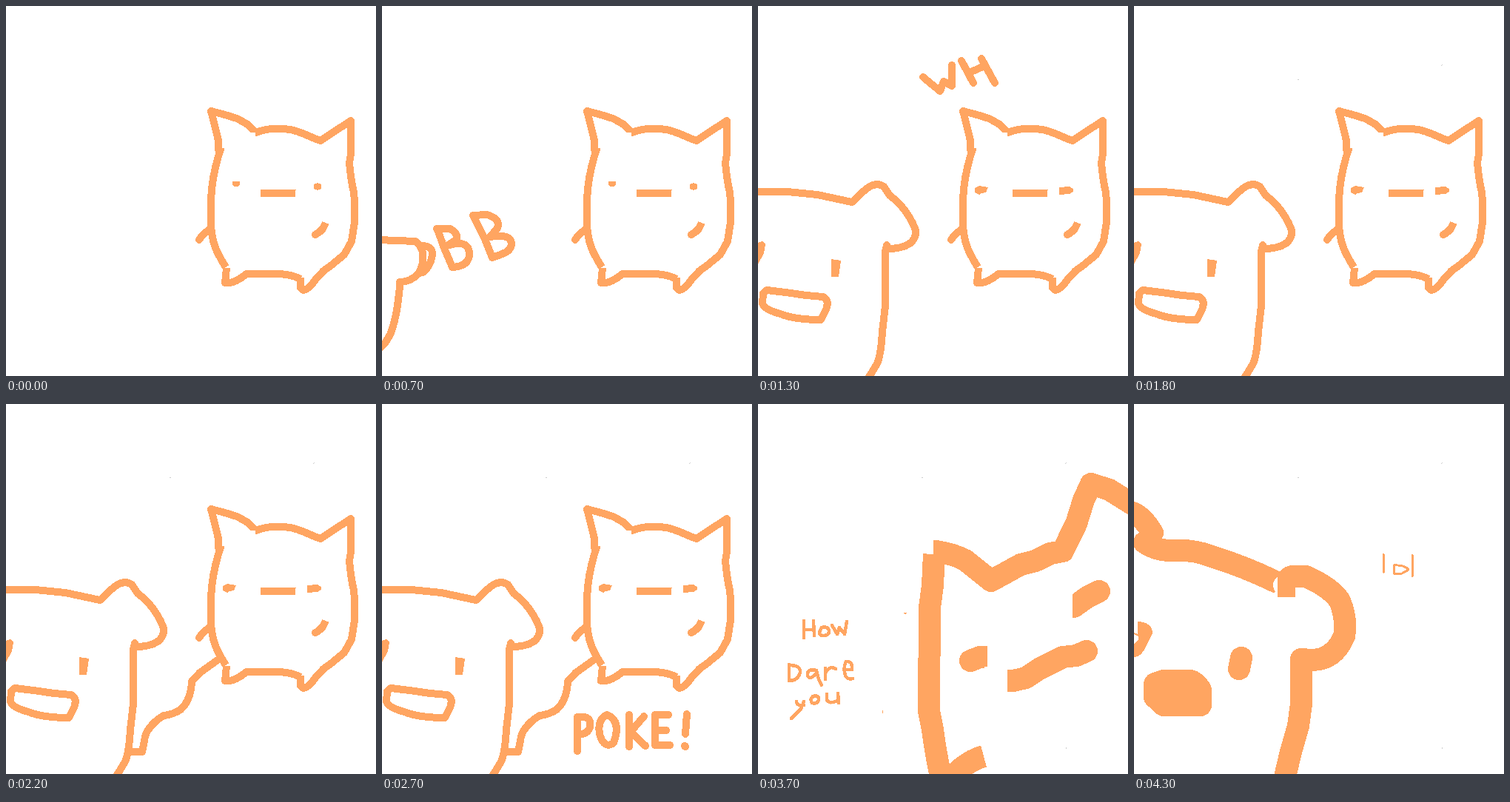
An HTML page that plays this animation: 500 by 500 pixels, repeating every 4500 ms.

```html
<!DOCTYPE html>
<html lang="en">
<head>
<meta charset="utf-8">
<title>Poke</title>
<style>
html, body { margin: 0; width: 100%; height: 100%; overflow: hidden; background: #fff; }
svg { display: block; width: 100%; height: 100%; }
path { fill: none; stroke: #ffa561; stroke-linecap: round; stroke-linejoin: round; shape-rendering: crispEdges; }
.butt { stroke-linecap: butt; }
.solid { fill: #ffa561; stroke: none; }
.erase { fill: #fff; stroke: none; }
.speck { stroke: #ccc; stroke-width: 1; }
</style>
</head>
<body>
<!-- data-t: when a part appears and, optionally, when it goes (ms) -->
<svg viewBox="0 0 500 500">
  <g data-t="0 3000" stroke-width="10">
    <!-- cat -->
    <path d="M287 194L287 182 283 165 277 142L296 147 312 152 325 159 338 171C352 165 370 165 384 167 400 170 410 177 425 182L437 174 466 155V200L464 212Q466 235 470 252L471 264V292L467 318 457 336 440 350 429 358 418 370Q409 383 402 384L398 381"/>
    <path class="butt" d="M398 383V367M398 369C382 361 370 362 345 362H325Q308 376 296 374L298 354M291 191C277 230 276 260 277 295 278 322 286 335 297 353"/>
    <path d="M325 362Q308 376 297 374M261 316Q265 309 275 302M418 309Q424 306 428 301"/>
    <path class="butt" d="M426 303Q430 299 432 293M344 253H392"/>
    <path class="erase" d="M331 171h6v5h-6zM391 249h4v9h-4z"/>
    <g data-t="0 1100">
      <path class="solid" d="M306 237H316V242L313 244H309L306 242ZM416 241L421 239 426 241V247L421 249 416 247Z"/>
    </g>
    <g data-t="1100">
      <path class="solid" d="M293 246L299 243 311 245 308 252 301 253 299 255 293 252ZM407 245L421 244 426 247V251L421 254 407 255Z"/>
    </g>

    <!-- arm and noise -->
    <g data-t="100 800">
      <path d="M-5 316L45 318Q52 322 55 333 57 350 49 362"/>
      <path data-t="200" d="M49 362Q38 373 24 373V380L21 405Q17 430 11 444L5 454-4 464"/>
      <path data-t="300" d="M55 324Q69 325 68 336 66 352 55 360"/>
      <path data-t="400" d="M74 301H92Q104 308 100 316L88 324Q119 314 118 337 116 352 95 353L84 327 75 302"/>
      <path data-t="500" d="M149 340L139 315 123 283 142 282Q161 288 156 300L146 312"/>
      <path data-t="600" d="M146 312Q176 307 175 323 173 332 162 335"/>
      <path data-t="700" d="M163 335L149 340"/>
    </g>

    <!-- pig -->
    <g data-t="800">
      <path d="M-5 251H40L80 255 127 265 143 250Q158 236 170 244L178 256Q200 272 212 300 216 312 205 321 195 328 174 328"/>
      <path data-t="900" d="M174 323L172 332V405L168 440Q166 475 160 485L149 503"/>
      <path data-t="1000" class="solid" d="M-1 320L6 318 10 322 8 334 0 349ZM99 342L112 344 109 366H99Z"/>
      <path data-t="1000" d="M12 384Q40 387 65 391L88 393Q97 398 92 410L85 424Q50 424 30 416 8 410 6 402L7 388Z"/>
    </g>
    <g data-t="1200 1800">
      <path d="M223 96L246 115 251 102 262 108V80"/>
      <path data-t="1300" d="M275 74L291 104M302 71L320 104M288 89L306 81"/>
      <path data-t="1400" d="M338 95L345 50 372 84M342 76L362 67"/>
      <path data-t="1500" d="M375 40L415 21M394 32L411 77"/>
    </g>

    <!-- reach and poke -->
    <path class="butt" data-t="1900" d="M169 470H184L187 455Q188 445 194 438"/>
    <path data-t="2000" d="M193 439Q200 429 213 421 225 420 236 413"/>
    <path data-t="2100" d="M236 413Q250 400 251 375"/>
    <path data-t="2200" d="M251 375L262 363 286 346"/>
    <g>
      <path data-t="2300" d="M264 469V423Q284 420 281 437 277 447 266 446"/>
      <path data-t="2400" d="M304 420Q291 426 294 446 300 467 313 458 324 428 304 420"/>
      <path data-t="2500" d="M334 420V463M354 422L336 443 356 462"/>
      <path data-t="2600" d="M387 420H369V461H389M370 441H384"/>
      <path data-t="2700" d="M412 419L410 446M409 462L410 463"/>
    </g>
  </g>

  <!-- cat close-up -->
  <g data-t="3000 4000" stroke-width="30">
    <path class="butt" d="M238 203L236 245 232 275 231 415 236 440Q240 472 248 508M237 199H241Q265 203 280 211L315 239M252 512L275 492Q290 480 305 476"/>
    <path d="M315 239L355 217 375 212 395 202 412 199 420 182 430 162 440 130 450 108 475 116 510 138"/>
    <path d="M287 347L300 342H320M325 374H345L362 370 380 358 412 342 430 340 444 334M410 275L427 274 445 261 461 253"/>
    <path class="erase" d="M310 325h27v70h-27zM306 355h31v40h-31zM390 255h35v40h-35z"/>
    <g stroke-width="4.5">
      <path data-t="3100" d="M62 293V316M62 305H75M75 293L76 313"/>
      <path data-t="3200" d="M86 302Q80 312 87 313 97 313 96 306 94 300 86 302"/>
      <path data-t="3300" d="M100 299L107 311 110 302 117 311 120 294"/>
      <path data-t="3400" d="M42 352V373M42 353Q58 353 57 363 54 374 42 374"/>
      <path data-t="3500" d="M79 360Q66 357 67 367 70 374 79 364V360L82 372 86 380"/>
      <path data-t="3600" d="M91 357V372M92 362Q98 353 105 358M116 359H127Q128 347 119 348 115 356 118 367 121 373 128 371"/>
      <path data-t="3700" d="M52 402Q53 409 62 407M62 402L58 412 45 425M76 395Q69 397 73 404 81 406 82 399 82 393 74 395M93 392V400Q97 406 107 401M108 391L109 404"/>
    </g>
  </g>

  <!-- pig close-up -->
  <g data-t="4000" stroke-width="30">
    <path d="M-8 146Q8 146 25 174 22 182 14 187 30 198 50 198 80 196 105 206 150 220 191 240"/>
    <path class="butt" d="M203 261V248Q206 233 215 233H232Q265 247 278 266 288 290 284 314 270 346 240 346L226 345V405L222 435 212 470 203 508"/>
    <path class="erase" d="M194 234Q187 239 188 247L191 254 186 256V263H194Z"/>
    <path d="M226 345V350M145 343L142 358"/>
    <path style="fill:#ffa561" d="M28 378L40 374H75Q82 374 90 386V407H40L28 396Z"/>
    <path class="solid" d="M5 294Q25 295 25 310 20 320 14 332 8 342 0 342V324L6 319V314L0 311V309L5 311Z"/>
    <g stroke-width="3">
      <path data-t="4100" d="M337 203V227H338"/>
      <path data-t="4200" d="M351 218V229H362L371 224Q366 217 351 218"/>
      <path data-t="4300" d="M376 204V233"/>
    </g>
  </g>

  <!-- crumbs left by erasing -->
  <path class="speck" data-t="800" d="M22 283h0"/>
  <path class="speck" data-t="1800" d="M221 100l2-1M415 81l2-2M385 89h0"/>
  <path class="speck" data-t="3000" d="M416 466l1-2"/>
  <path class="solid" data-t="3000 4000" d="M197 282h4l-2 3zM168 414h1v4h-1z"/>
</svg>
<script>
const LOOP = 4500;
const parts = [...document.querySelectorAll('[data-t]')].map(el => {
  const [from, to = LOOP] = el.dataset.t.split(' ').map(Number);
  return { el, from, to };
});

function draw() {
  const t = performance.now() % LOOP;
  for (const { el, from, to } of parts) {
    el.style.display = t >= from && t < to ? '' : 'none';
  }
  requestAnimationFrame(draw);
}
draw();
</script>
</body>
</html>
```
